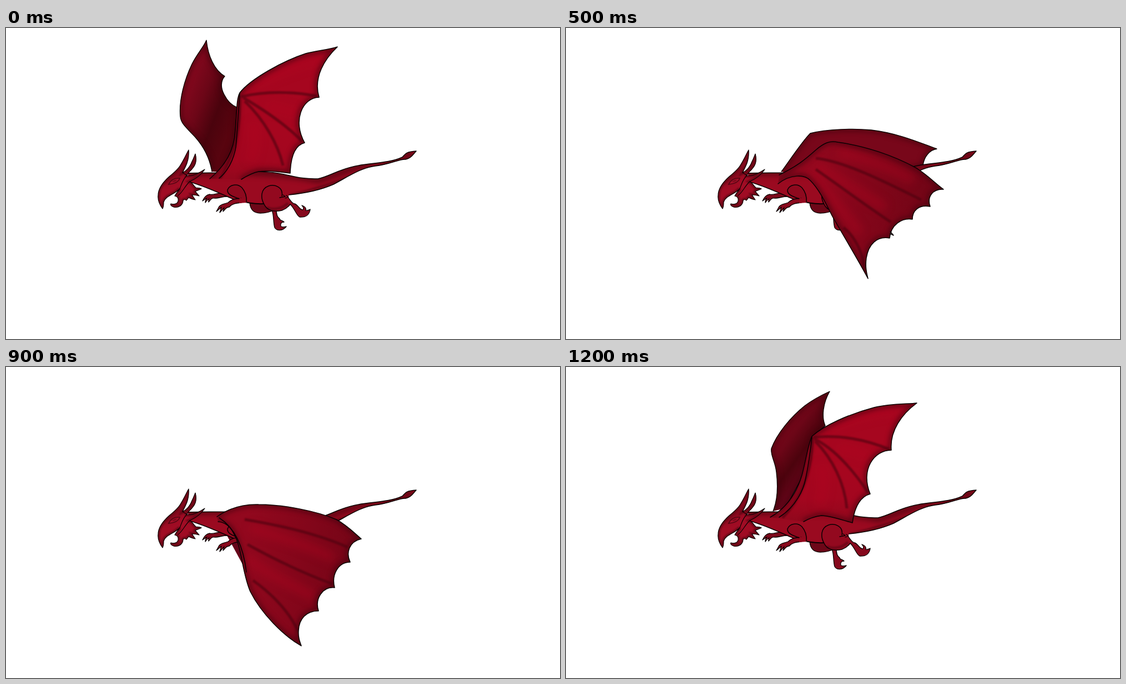
These frames come from a looping animation (998x561 px, 1.3 s). An HTML page:

```html
<!DOCTYPE html>
<html lang="en">
<head>
<meta charset="utf-8">
<title>Flying dragon</title>
<style>
  html, body { margin: 0; width: 100%; height: 100%; overflow: hidden; background: #fff; }
  svg { display: block; width: 100%; height: 100%; }
  .ink { fill: none; stroke: #0a0002; stroke-width: 1.5; stroke-linejoin: round; stroke-linecap: round; }
  .part { stroke: #0a0002; stroke-width: 1.3; stroke-linejoin: round; }
</style>
</head>
<body>
<svg id="stage" viewBox="0 0 998 561" xmlns="http://www.w3.org/2000/svg"></svg>
<script>
const STEP = 100;
const stage = document.getElementById('stage');

// Numbers of path a moved towards path b by k; both share one structure.
function mix(a, b, k) {
  const to = b.match(/-?[\d.]+/g);
  let i = 0;
  return a.replace(/-?[\d.]+/g, n => (+n + (to[i++] - n) * k).toFixed(1));
}

const mixPose = (a, b, k) => {
  const out = { ...a };
  for (const key of ['far', 'near', 'lines', 'dark', 'glow']) out[key] = mix(a[key], b[key], k);
  return out;
};

const top3 = 'M430 150C470 145 520 118 560 98M450 190C485 175 520 160 560 158M430 240C450 225 460 195 450 165';

const up = {
  far: 'M371 259C367 235 356 214 341 197C325 180 315 172 314 160C311 130 322 92 335 65C345 45 355 36 361 22C364 50 375 76 394 87C386 96 387 109 393 120C399 132 408 140 416 143L412 205L390 260',
  farFill: 'url(#farUp)',
  near: 'M367 272C395 248 411 222 413 185C416 150 415 128 421 117C440 92 500 59 540 46C560 41 582 39 597 34C575 55 553 88 564 125C533 126 516 168 538 207C522 211 513 230 512 262C490 259 470 257 455 259C445 261 432 268 424 273',
  nearFill: 'url(#nearUp)',
  lines: 'M384 271C405 254 414 225 415 205C417 175 419 145 421 118',
  dark: 'M424 124C470 113 520 115 560 123M428 126C460 145 505 175 534 205M430 132C465 165 490 210 499 248M420 122C423 160 418 220 385 272',
  glow: 'M450 100C490 80 530 65 570 55M470 140C490 145 510 150 525 155M440 240C450 220 450 190 445 170'
};

const high = {
  far: 'M373 260C381 240 382 215 379 190C377 170 368 160 370 147C380 120 405 90 430 70C447 57 462 50 475 44C463 65 460 90 467 106L445 125L430 190L395 255',
  farFill: 'url(#farHigh)',
  near: 'M368 271C398 254 416 225 425 195C433 165 436 140 443 125C465 105 510 85 555 73C585 66 615 67 632 65C605 85 583 115 586 150C555 150 530 185 548 229C532 233 520 250 516 281C500 277 480 269 460 268C445 270 435 275 428 279',
  nearFill: 'url(#nearUp)',
  lines: 'M384 271C414 252 428 222 432 200C438 170 441 145 443 126',
  dark: 'M446 127C490 122 540 130 583 149M448 130C485 148 520 190 544 226M449 134C480 165 502 210 506 255M443 127C445 165 435 225 390 272',
  glow: 'M475 108C515 90 560 80 595 78M490 145C510 150 530 155 545 162M455 250C465 230 465 200 460 175'
};

const raised = {
  far: 'M381 260C391 235 391 215 389 190C388 170 384 150 386 134C395 110 420 85 450 65C475 49 495 45 512 35C500 55 492 80 497 106L460 130L440 200L400 245',
  farFill: 'url(#farHigh)',
  near: 'M368 270C400 255 425 228 438 195C446 172 454 140 462 130C485 110 530 95 575 88C610 84 640 87 659 86C630 105 605 135 604 168C575 165 545 200 557 244C540 248 527 262 520 294C500 285 480 276 460 277C447 278 437 281 429 284',
  nearFill: 'url(#nearUp)',
  lines: 'M384 271C420 252 435 222 446 195C453 172 459 145 462 130M462 130C462 130 462 130 462 130M462 130C462 130 462 130 462 130M462 130C462 130 462 130 462 130',
  dark: 'M466 131C510 130 565 145 601 166M468 133C500 148 535 200 552 240M469 138C495 170 508 220 508 270M462 132C465 165 450 235 395 272',
  glow: 'M500 112C540 98 585 96 620 95M510 150C530 155 550 165 565 175M470 260C480 240 485 210 478 180'
};

const level = {
  far: 'M376 267C405 243 413 222 417 200C420 180 424 160 430 150C440 137 480 118 500 111C530 103 550 104 573 101C558 113 545 128 540 146L500 160L440 200L400 250',
  farFill: '#74071a',
  near: 'M366 272C400 254 416 227 430 203C442 183 455 173 470 165C500 151 545 146 575 140C605 137 630 146 648 153C615 162 588 185 588 228C555 215 535 235 539 257C515 260 505 280 498 303C480 295 465 290 450 287C435 283 415 280 400 291',
  nearFill: 'url(#nearLevel)',
  lines: 'M372 279C405 262 418 237 430 215C440 198 454 188 472 188M472 188C510 193 550 207 588 228M478 190C500 205 515 225 531 246M470 190C485 215 492 250 491 288',
  dark: 'M472 186C510 190 550 204 588 226M478 189C500 204 515 222 531 244M468 190C485 215 490 250 489 288M560 190C590 180 610 170 635 152',
  glow: 'M470 178C510 165 550 160 590 155M495 230C505 240 515 246 525 250M430 260C445 250 455 235 460 215'
};

const sail = {
  near: 'M384 265C415 250 430 238 450 220C465 207 475 203 490 206C540 213 590 230 630 252C650 264 665 280 680 291C660 290 650 305 656 322C635 318 624 330 624 345C605 342 585 355 583 379C560 375 545 390 541 415C539 430 541 440 544 452C530 425 500 375 480 340C465 310 455 290 440 275C430 264 405 263 382 281',
  nearFill: 'url(#nearSail)',
  dark: 'M450 235C500 240 570 275 640 310M450 255C500 290 540 320 585 350M500 360C525 380 535 410 540 440',
  glow: 'M490 225C540 235 590 255 625 275M450 245C490 275 530 295 575 325M440 262C475 295 500 335 530 370'
};

const spread = {
  ...sail,
  far: 'M388 259C400 243 425 205 440 190C470 182 520 181 550 184C600 190 640 208 668 218C655 220 645 232 643 248L500 280L400 262',
  farFill: '#78071a',
  lines: 'M584 367L590 374L584 371'
};

const sweep = {
  ...sail,
  far: 'M384 264C410 248 440 224 462 208L640 262L685 305C665 306 652 318 650 332L620 343C605 345 593 352 591 358L556 380C552 400 556 415 557 428C552 420 545 408 540 395L470 270',
  farFill: '#6a0617',
  lines: 'M671 291C655 295 648 306 650 320'
};

const low = {
  far: 'M385 280L450 260L530 300L520 420L450 400',
  farFill: '#66051a',
  near: 'M380 270C400 256 425 247 455 248C500 248 560 260 595 275C615 286 628 300 640 310C618 315 612 335 620 352C598 352 586 375 592 398C570 396 556 418 563 440C540 440 528 455 527 475C526 487 529 495 532 503C500 485 460 445 440 405C425 370 425 325 410 300C404 288 395 280 382 279',
  nearFill: 'url(#nearSail)',
  lines: 'M384 272C412 290 428 325 433 370',
  dark: 'M430 275C490 285 560 300 615 325M435 320C480 345 530 370 590 392M445 385C480 410 510 440 528 480',
  glow: 'M440 290C490 305 550 325 590 345M435 345C470 375 520 395 555 415'
};

const down = {
  far: 'M376 308C365 335 344 365 340 378C336 400 345 420 358 445C370 465 382 475 395 491C393 480 395 472 398 468L376 425L390 340L392 300',
  farFill: '#6c0518',
  near: 'M372 275C384 288 391 305 390 330C388 365 374 390 376 425C382 447 405 475 435 502C465 525 490 532 514 548C500 530 508 505 524 496L538 500C527 480 528 462 546 448C528 420 538 390 566 376C548 360 550 340 566 323C552 315 547 300 545 278C520 278 495 278 470 276C440 270 405 274 385 279',
  nearFill: 'url(#nearDown)',
  lines: 'M386 279C400 295 398 320 393 345C386 375 378 398 376 425',
  dark: 'M410 325C450 335 510 345 558 350M415 400C450 410 500 425 535 430M390 440C430 455 480 475 520 490M396 300C400 340 390 380 380 420',
  glow: 'M410 365C450 370 490 390 540 392M400 425C440 435 480 455 520 460M420 310C460 315 510 315 545 310'
};

const settle = mixPose(raised, level, 0.5);
const cycle = [up, high, raised, settle, level, spread, low, down, down, low, sweep, level, high];
const poses = [...new Set(cycle)];

const grad = (id, x1, y1, x2, y2, ...stops) =>
  `<linearGradient id="${id}" gradientUnits="userSpaceOnUse" x1="${x1}" y1="${y1}" x2="${x2}" y2="${y2}">` +
  stops.map((c, i) => `<stop offset="${i / (stops.length - 1)}" stop-color="${c}"/>`).join('') + '</linearGradient>';

const blur = (id, s) =>
  `<filter id="${id}" filterUnits="userSpaceOnUse" x="0" y="0" width="998" height="561" color-interpolation-filters="sRGB"><feGaussianBlur stdDeviation="${s}"/></filter>`;

const soft = (d, color, width, filter, alpha) =>
  `<g filter="url(#${filter})"><path d="${d}" fill="none" stroke="${color}" stroke-width="${width}" opacity="${alpha}"/></g>`;

const ink = (d, w = 1.5) => `<path class="ink" d="${d}" style="stroke-width:${w}"/>`;
const part = (d, fill) => `<path class="part" d="${d}" fill="${fill}"/>`;

function shaded(id, d, fill, detail) {
  return `<clipPath id="${id}"><path d="${d}"/></clipPath><path d="${d}" fill="${fill}"/>` +
    `<g clip-path="url(#${id})">${detail}</g>`;
}

const farWing = (p, i) => `<g class="pose${i}">` +
  shaded('far' + i, p.far, p.farFill, soft(p.far, '#3c020c', 9, 'b5', 0.55)) + ink(p.far, 1.3) + '</g>';

const nearWing = (p, i) => `<g class="pose${i}">` +
  shaded('near' + i, p.near, p.nearFill,
    soft(p.glow, '#b50722', 16, 'b8', 0.4) +
    soft(p.near, '#45030f', 10, 'b5', 0.6) +
    soft(p.dark, '#4d0310', 5, 'b2', 0.6)) +
  ink(p.near) + ink(p.lines) + '</g>';

const trunk = 'M327 262C350 261 380 261 400 261C425 258 465 258 490 262C515 266 530 273 562 272C585 267 600 254 635 248C660 243 690 244 714 233C720 226 722 223 739 222C733 228 730 235 720 237C708 236 692 246 665 249C640 252 618 267 590 282C565 293 540 298 510 301L497 328L465 317C445 318 430 314 410 309C385 298 360 286 332 278Z';

const body =
  // far legs
  part('M439 315C440 327 446 334 458 334C470 334 478 331 484 328L480 314Z', '#6d0718') +
  part('M479 329C483 338 481 350 484 360C488 367 499 366 505 358C500 359 497 360 495 357C494 352 497 350 501 350C497 346 493 348 493 344C488 341 487 336 487 328Z', '#86091d') +
  part('M392 296C380 298 374 302 367 300C360 301 357 306 354 312C358 309 361 307 362 307C359 310 359 313 359 315C362 311 364 309 366 308C364 311 365 313 365 314C369 309 371 306 376 307C384 307 390 304 398 304Z', '#7c081b') +
  // trunk and tail
  shaded('trunk', trunk, '#9a0a20',
    soft('M327 261C380 259 480 255 562 274C600 262 650 240 735 226', '#4a0410', 14, 'b5', 0.6) +
    soft('M735 234C650 248 610 280 510 302', '#4a0410', 5, 'b2', 0.5)) +
  ink('M332 278C360 286 385 298 410 309M327 262C350 261 380 261 400 261C425 258 465 258 490 262C515 266 530 273 562 272C585 267 600 254 635 248C660 243 690 244 714 233C720 226 722 223 739 222C733 228 730 235 720 237C708 236 692 246 665 249C640 252 618 267 590 282C565 293 540 298 510 301') +
  ink('M410 309C430 314 445 318 465 317', 2) +
  // near foreleg
  '<path d="M399 293C402 283 416 280 424 288C431 295 434 304 433 314L420 308C408 304 399 300 399 293Z" fill="#8e091e"/>' +
  part('M424 307C412 308 406 309 400 315C392 318 388 317 384 322L379 331C383 328 386 325 388 323L385 333C389 329 391 326 393 324L391 331C396 327 396 323 402 323C407 317 414 316 424 315Z', '#8a091d') +
  '<path d="M420 306L434 308L434 315L420 316Z" fill="#92091e"/>' +
  ink('M420 308C408 304 398 300 399 292C403 282 417 280 425 288C431 295 434 304 433 314') +
  // near haunch and foot
  part('M505 302C511 307 512 314 519 317C525 317 527 326 534 328C537 327 536 323 533 320C539 322 541 325 540 329C544 330 546 328 548 327C547 336 541 342 529 341C523 338 521 327 512 318L497 318Z', '#86091d') +
  '<path d="M497 303C500 288 485 281 473 285C459 290 458 306 465 318C470 330 485 332 497 329C507 325 512 320 513 316L506 301Z" fill="#93091f"/>' +
  soft('M470 324C485 330 500 324 508 316', '#4a0410', 5, 'b2', 0.45) +
  ink('M497 303C500 288 485 281 473 285C459 290 458 306 465 318C470 330 485 332 497 329C505 326 509 322 512 318') +
  ink('M493 306L503 304L499 301M503 307L509 305L505 302', 1.3);

const skull = 'M282 326C277 319 273 311 274 302C274 288 284 277 294 268C304 260 311 254 315 246C320 238 324 229 329 220C330 232 327 243 323 251L318 261C326 257 332 249 335 241C338 235 339 232 341 227C344 238 342 246 337 252C333 258 327 261 326 266C334 268 346 263 358 255C351 266 340 273 331 277C337 280 337 284 342 288C346 289 349 288 352 290C347 293 343 293 341 295L348 303C341 301 338 301 335 301L341 310C335 309 332 307 329 306L325 311C322 309 321 309 319 311C319 320 310 325 302 323C297 321 296 319 297 317C303 319 309 317 310 312C311 307 309 304 304 303C306 298 310 295 313 290C304 300 287 303 284 314C284 319 284 322 282 326Z';

const head = shaded('skull', skull, '#a00c24',
    soft(skull, '#4a0410', 7, 'b2', 0.55) +
    soft('M284 280C295 270 312 262 325 250', '#5c0614', 8, 'b5', 0.6)) +
  ink(skull, 1.2) +
  ink('M326 266C318 273 316 283 313 290M331 277C322 285 318 297 310 302M318 261L326 266', 1.2) +
  '<path d="M293 282C297 274 304 270 313 271C311 277 304 281 293 282Z" fill="#a51028" stroke="#5a0614" stroke-width="1.8"/>' +
  '<path d="M299 278C302 274 305 273 308 274C306 277 303 278 299 278Z" fill="#7b0a1c"/>';

stage.innerHTML = '<defs>' +
  blur('b2', 1.2) + blur('b5', 4.5) + blur('b8', 8) +
  grad('farUp', 318, 130, 410, 165, '#82081d', '#6c0617', '#4a030d', '#58040f') +
  grad('farHigh', 380, 110, 455, 165, '#78071a', '#6c0617', '#4c030d', '#66051a') +
  grad('nearUp', 0, 190, 0, 285, '#a6061f', '#a3061f', '#8d081c') +
  grad('nearLevel', 0, 140, 0, 295, '#7a0619', '#86061a', '#96081e') +
  grad('nearSail', 430, 300, 650, 330, '#92081e', '#83061a', '#720516') +
  grad('nearDown', 380, 0, 560, 0, '#86061a', '#80051a', '#720416') +
  '</defs>' +
  poses.map(farWing).join('') + body + head + poses.map(nearWing).join('');

const layers = poses.map((p, i) => stage.querySelectorAll('.pose' + i));

function draw(ms) {
  const now = poses.indexOf(cycle[Math.floor(ms / STEP) % cycle.length]);
  layers.forEach((set, i) => set.forEach(g => { g.style.display = i === now ? '' : 'none'; }));
}

const start = performance.now();
function tick() {
  draw(performance.now() - start);
  requestAnimationFrame(tick);
}
draw(0);
requestAnimationFrame(tick);
</script>
</body>
</html>
```
